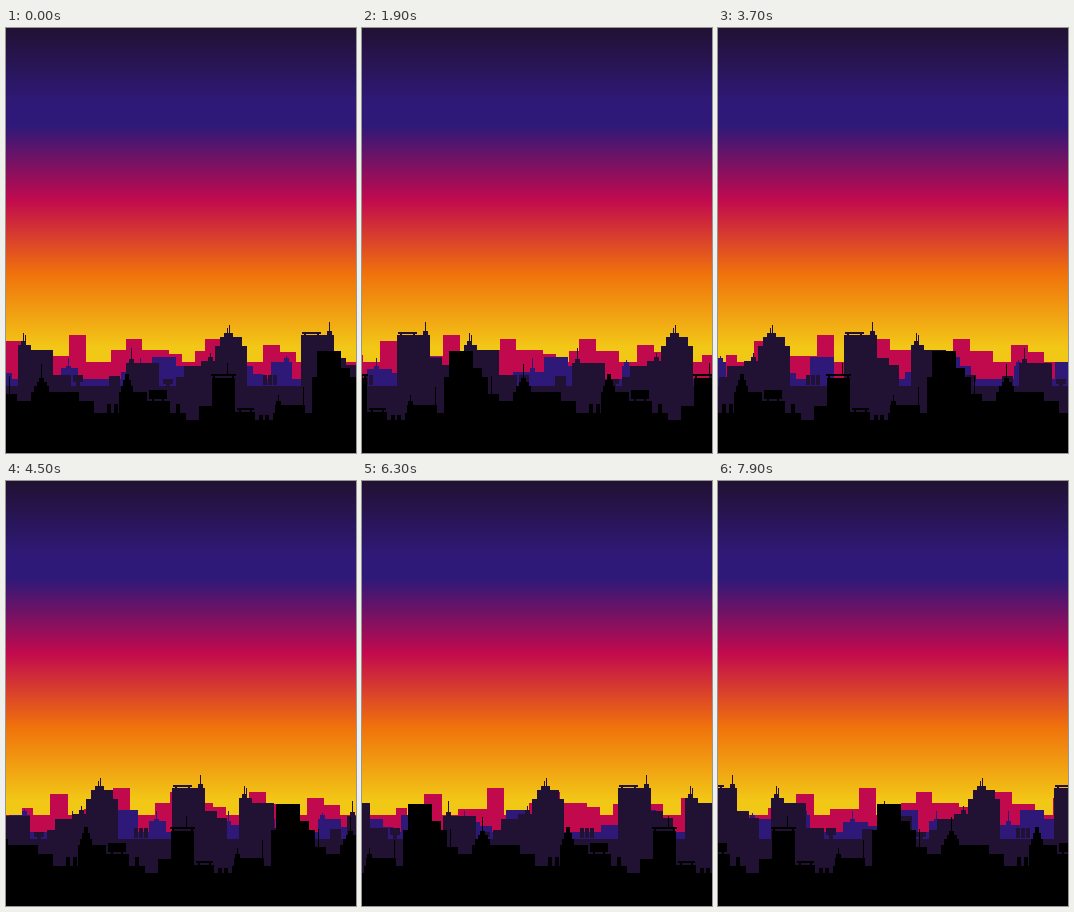
An HTML page with a canvas that plays this animation: 350 by 425 pixels, repeating every 8 s.

```html
<!DOCTYPE html>
<html lang="en">
<head>
<meta charset="utf-8">
<title>Sunset skyline</title>
<style>
  html, body { margin: 0; width: 100%; height: 100%; overflow: hidden; background: #000; }
  canvas { display: block; width: 350px; height: 425px; }
</style>
</head>
<body>
<canvas id="stage" width="350" height="425"></canvas>
<script>
const WIDTH = 350, HEIGHT = 425, LOOP = 8000, STEP = 100;
const NIGHT = '#211133', INDIGO = '#2f1978', CRIMSON = '#c10a4e', ORANGE = '#f0720c', YELLOW = '#f2c817';
const ctx = document.getElementById('stage').getContext('2d');

// Each colour melts into the next over an equal share of the sky
const BLEND = 74;
const sky = ctx.createLinearGradient(0, 0, 0, HEIGHT);
const addStop = (y, color) => sky.addColorStop(y / HEIGHT, color);
addStop(0, NIGHT);
addStop(BLEND, INDIGO);
[INDIGO, CRIMSON, ORANGE, YELLOW].forEach((color, i) => addStop(98 + i * BLEND, color));

// Vocabulary for one row of buildings, collected in a single path
class Skyline {
  constructor(color, speed, ground) {
    Object.assign(this, { color, speed, path: new Path2D() });
    this.block(0, WIDTH, ground);
  }
  box(x, y, w, h) {
    this.path.rect(Math.round(x), y, w, h);
    return this;
  }
  block(left, right, top) {
    return this.box(left, top, right - left, HEIGHT - top);
  }
  mast(x, top, height) {
    return this.box(x, top, 1, height);
  }
  spire(x, top, height = 12) {
    return this.mast(x, top, height).box(x - 2, top + height - 4, 5, 4);
  }
  dome(center, top, tiers, grow, rise) {
    for (let i = 0; i < tiers; i++) {
      const w = grow * (i + 1), y = top + rise * i;
      this.box(center - w / 2, y, w, HEIGHT - y);
    }
    return this;
  }
  sign(x, y, w, h) {
    return this.box(x, y, w, h).box(x + 3, y + h, 2, 4).box(x + w - 5, y + h, 2, 4);
  }
  chimneys(x, top, count, pitch, height = 10) {
    for (let i = 0; i < count; i++) this.box(x + i * pitch, top, 4, height);
    return this;
  }
  // roof terrace carried by a slightly narrower floor
  terrace(x, y, w) {
    return this.box(x, y, w, 2).box(x + 2, y + 2, 2, 3).box(x + w - 4, y + 2, 2, 3);
  }
  draw(step) {
    const shift = Math.round(step * this.speed) % WIDTH;
    ctx.fillStyle = this.color;
    for (const x of [shift, shift - WIDTH]) {
      ctx.setTransform(1, 0, 0, 1, x, 0);
      ctx.fill(this.path);
    }
    ctx.resetTransform();
  }
}

const horizon = new Skyline(CRIMSON, 1, 334)
  .block(0, 18, 313)
  .block(34, 63, 328)
  .block(63, 80, 307)
  .block(105, 163, 322).block(120, 136, 311)
  .block(163, 176, 326)
  .block(189, 239, 323).block(199, 216, 311)
  .block(257, 290, 324).block(257, 274, 317)
  .block(322, 333, 327);

const distant = new Skyline(INDIGO, 2, 351)
  .block(20, 44, 329)
  .block(55, 72, 340).spire(62, 330)
  .block(115, 146, 344).spire(134, 330, 14)
  .block(146, 170, 329).block(170, 181, 338)
  .block(224, 247, 338).spire(228, 332, 6).block(247, 257, 346)
  .block(265, 286, 334).spire(280, 328, 6)
  .block(319, 344, 341).spire(328, 330)
  .block(344, 356, 345);

const middle = new Skyline(NIGHT, 5.015, 358)
  .block(12, 47, 322).block(12, 25, 317).spire(17, 305).mast(19, 307, 10)
  .block(47, 65, 347).sign(67, 347, 10, 7)
  .block(103, 114, 348)
  .block(120, 153, 335).spire(125, 320, 15)
  .sign(157, 351, 10, 5)
  .block(170, 178, 349).block(178, 209, 338).block(195, 209, 333).spire(204, 325, 8)
  .block(209, 241, 318).block(214, 236, 309).block(218, 227, 305)
  .mast(221, 300, 5).mast(223, 297, 8)
  .chimneys(257, 347, 3, 5)
  .block(295, 328, 307).terrace(296, 304, 19).spire(323, 294, 13)
  .block(328, 340, 330).block(340, 350, 337);

const front = new Skyline('#000', 7.02, 392)
  .block(-6, 11, 366).mast(3, 348, 18)
  .block(11, 88, 373).block(25, 73, 364).dome(35.5, 350, 3, 5, 4).mast(35, 336, 14)
  .block(88, 180, 385).chimneys(101, 376, 2, 7)
  .block(113, 164, 373).block(113, 141, 364).dome(120.5, 346, 4, 4, 6)
  .sign(143, 362, 18, 9).chimneys(170, 376, 1, 0)
  .block(193, 229, 378).block(206, 229, 350).terrace(205, 346, 25).mast(221, 335, 11)
  .block(229, 249, 384).terrace(231, 380, 17)
  .chimneys(253, 387, 2, 6)
  .block(267, 306, 385).block(269, 299, 377).spire(272, 367, 10).mast(297, 359, 18)
  .block(306, 350, 349).block(311, 344, 340).block(311, 335, 323);

const layers = [horizon, distant, middle, front];

function render(now) {
  // the opening pose is held for two steps
  const step = Math.max(0, Math.floor(now % LOOP / STEP) - 1);
  ctx.fillStyle = sky;
  ctx.fillRect(0, 0, WIDTH, HEIGHT);
  for (const layer of layers) layer.draw(step);
}

function tick() {
  render(performance.now());
  requestAnimationFrame(tick);
}
tick();
</script>
</body>
</html>
```
